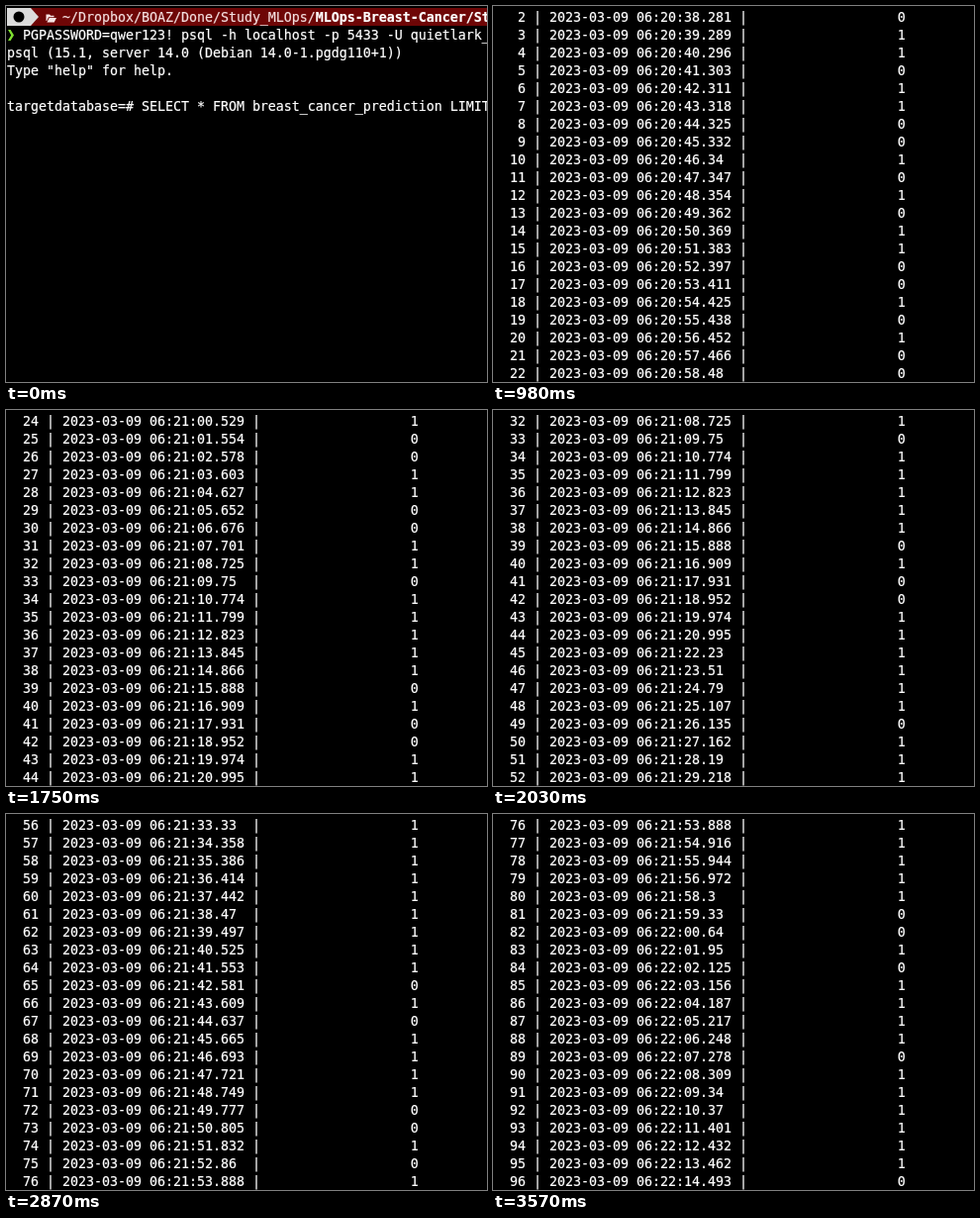
Write an HTML page that moves like this. It is 486 px wide and 380 px high and loops after 3640 ms.

```html
<!DOCTYPE html>
<html lang="en">
<head>
<meta charset="utf-8">
<title>Query pager</title>
<style>
  html, body { margin: 0; width: 100%; height: 100%; overflow: hidden; background: #000; }
  #stage { position: relative; width: 486px; height: 380px; overflow: hidden; background: #000; color: #fff; }
  pre {
    position: absolute; left: 1px; top: 3px; margin: 0;
    font: 13.29px/18px "DejaVu Sans Mono", monospace;
    font-variant-ligatures: none;
    -webkit-text-stroke: 0.2px;
  }
  svg { position: absolute; left: 0; top: 0; }
  .path { color: #f3dede; }
  .path b { color: #fff; }
</style>
</head>
<body>
<div id="stage">
  <div id="shell">
    <svg width="486" height="40">
      <rect x="1" y="2" width="485" height="18" fill="#6e0606"/>
      <path d="M1 2H25L33 11L25 20H1Z" fill="#dcdcdc"/>
      <circle cx="13" cy="11" r="5.5" fill="#000"/>
      <path d="M40.5 15V8.5H44L45.2 9.8H48.5V11.2H43L41.2 15Z M43.7 12H51L48.7 16.5H41.4Z" fill="#f6e4e4"/>
      <path d="M2 24H4.6L8 29.5L4.6 35H2L5.2 29.5Z" fill="#7fe030"/>
    </svg>
    <pre><span class="path">       ~/Dropbox/BOAZ/Done/Study_MLOps/<b>MLOps-Breast-Cancer/St</b></span>
  PGPASSWORD=qwer123! psql -h localhost -p 5433 -U quietlark_
psql (15.1, server 14.0 (Debian 14.0-1.pgdg110+1))
Type "help" for help.

targetdatabase=# SELECT * FROM breast_cancer_prediction LIMIT</pre>
  </div>
  <pre id="pager"></pre>
</div>
<script>
const LOOP = 3640, STEP = 70, VISIBLE = 21, RECORDS = 96;

// Insert times in ms after 06:20:00, at the ids where the pace changes
const pace = [[1, 37274], [14, 50369], [22, 58480], [36, 72823], [44, 80995], [79, 116972], [96, 134493]];

function insertTime(id) {
  const k = Math.max(1, pace.findIndex(([end]) => id <= end));
  const [id0, t0] = pace[k - 1], [id1, t1] = pace[k];
  return Math.round(t0 + (t1 - t0) * (id - id0) / (id1 - id0));
}

let seed = 7;
function random() {
  seed = (seed * 16807) % 2147483647;
  return seed / 2147483647;
}

const two = n => String(n).padStart(2, "0");

function record(id) {
  const ms = insertTime(id);
  const sec = Math.floor(ms / 1000);
  const fraction = String(ms % 1000).replace(/0+$/, "");
  const stamp = `2023-03-09 06:${two(20 + Math.floor(sec / 60))}:${two(sec % 60)}.${fraction}`;
  const value = random() < 0.67 ? "1" : "0";
  return ` ${String(id).padStart(3)} | ${stamp.padEnd(23)} | ${value.padStart(19)}`;
}

const lines = [
  " id  |        timestamp        | breast_cancer_class",
  [5, 25, 21].map(n => "-".repeat(n)).join("+"),
  ...Array.from({ length: RECORDS }, (_, i) => record(i + 1))
];

// First visible line, or null while the pager is still empty
function topLine(t) {
  if (t < 350) return null;
  if (t < 700) return 0;
  if (t < 980) return 1;
  return 3 + 2 * Math.floor((t - 980) / STEP);
}

const shell = document.getElementById("shell");
const pager = document.getElementById("pager");
const start = performance.now();
let shown;

function draw() {
  const t = (performance.now() - start) % LOOP;
  shell.style.visibility = t < 280 ? "visible" : "hidden";
  const top = topLine(t);
  if (top !== shown) {
    pager.textContent = top === null ? "" : lines.slice(top, top + VISIBLE).join("\n");
    shown = top;
  }
  requestAnimationFrame(draw);
}
draw();
</script>
</body>
</html>
```
